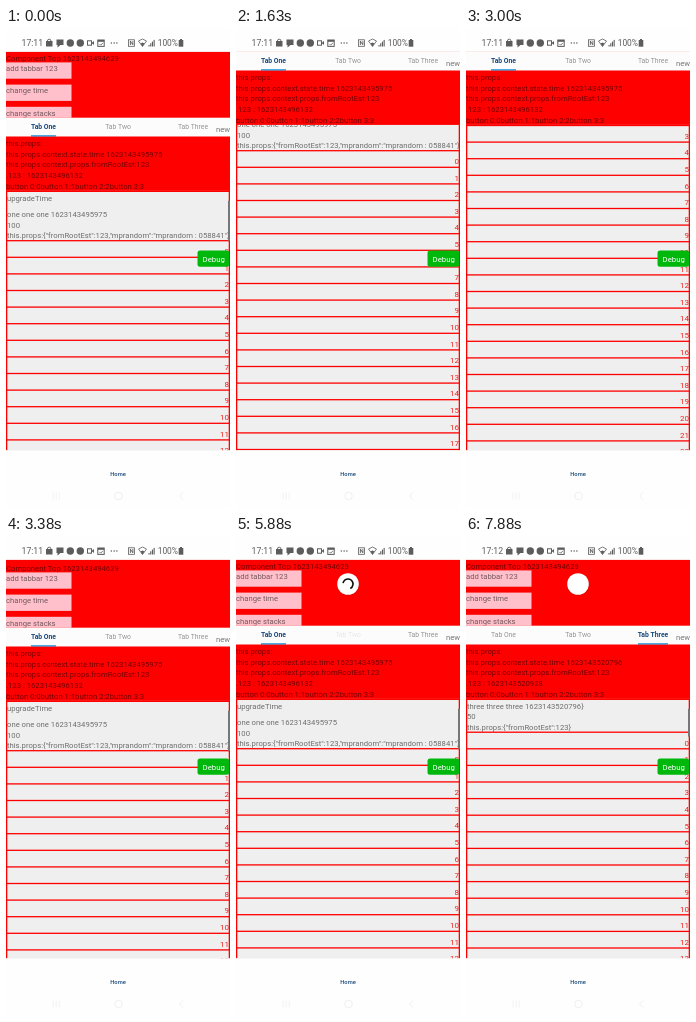
These frames come from a looping animation (224 by 480 pixels, 8000 ms). An HTML page with a canvas:

```html
<!DOCTYPE html>
<html lang="en">
<head>
<meta charset="utf-8">
<title>Tabbed list</title>
<style>
html, body { margin: 0; width: 100%; height: 100%; overflow: hidden; background: #fefefe; }
canvas { display: block; width: 224px; height: 480px; }
</style>
</head>
<body>
<canvas id="stage"></canvas>
<script>
const W = 224, H = 480, LOOP = 8000, STEP = 125;
const BAR = 23.7, HEADER = 66, TABS = 19, PANEL = 54, LIST_END = 422.5, ROW = 16.6, EDGE = 1.3;
const RED = '#ff0000', PAPER = '#fefefe', INK = 'rgba(0,0,0,.54)', NAVY = '#1a4a7c';
const canvas = document.getElementById('stage');
const ctx = canvas.getContext('2d');
const dpr = window.devicePixelRatio || 1;
canvas.width = W * dpr;
canvas.height = H * dpr;

const scrollKeys = [
  [750, 0], [875, 8], [1000, 21], [1250, 50], [1625, 90], [1750, 122], [2000, 230],
  [2250, 345], [2500, 407], [2625, 396], [2875, 255], [3125, 75], [3375, -2], [3500, 0]
];
const pullKeys = [[4250, 0], [4750, 1], [6000, 1], [6125, 0], [7250, 0], [7625, 1]];
const tabs = [
  { name: 'Tab One', x: 37.5, w: 25, word: 'one' },
  { name: 'Tab Two', x: 112, w: 25, word: 'two' },
  { name: 'Tab Three', x: 187, w: 30, word: 'three' }
];

function sample(keys, t) {
  if (t <= keys[0][0]) return keys[0][1];
  for (let i = 1; i < keys.length; i++) {
    const [a, from] = keys[i - 1], [b, to] = keys[i];
    if (t <= b) return from + (to - from) * (t - a) / (b - a);
  }
  return keys[keys.length - 1][1];
}

function rect(x, y, w, h, color) {
  ctx.fillStyle = color;
  ctx.fillRect(x, y, w, h);
}

function disc(x, y, r, color) {
  ctx.fillStyle = color;
  ctx.beginPath();
  ctx.arc(x, y, r, 0, Math.PI * 2);
  ctx.fill();
}

function path(points, color, width = 1, fill = false) {
  ctx.beginPath();
  points.forEach(([x, y], i) => i ? ctx.lineTo(x, y) : ctx.moveTo(x, y));
  ctx.strokeStyle = ctx.fillStyle = color;
  ctx.lineWidth = width;
  fill ? ctx.fill() : ctx.stroke();
}

// y is the visual middle of the line
function text(s, x, y, { size = 7.7, color = INK, align = 'left', weight = 400 } = {}) {
  ctx.font = `${weight} ${size}px Roboto, sans-serif`;
  ctx.textAlign = align;
  ctx.fillStyle = color;
  ctx.fillText(s, x, y + size * .37);
}

function clipped(y, bottom, draw) {
  ctx.save();
  ctx.beginPath();
  ctx.rect(0, y, W, bottom - y);
  ctx.clip();
  draw();
  ctx.restore();
}

function drawStatus(time) {
  const c = '#5c5c5c';
  rect(0, 0, W, BAR, PAPER);
  text(time, 15.5, 15, { size: 8.7, color: c });
  rect(40, 13, 6.5, 5.5, c);
  ctx.strokeStyle = c;
  ctx.lineWidth = .9;
  ctx.beginPath();
  ctx.arc(43.2, 13, 1.8, Math.PI, 0);
  ctx.stroke();
  rect(50.5, 11.5, 7, 5.5, c);
  path([[51.5, 17], [54.5, 17], [51.5, 19.5]], c, 1, true);
  disc(64.3, 15, 3.7, c);
  disc(74.3, 15, 3.7, c);
  ctx.strokeRect(81.5, 12.8, 4, 4.4);
  path([[85.5, 15], [88, 13], [88, 17]], c, 1, true);
  ctx.strokeRect(91.8, 12, 6.4, 6.4);
  rect(91.8, 12, 6.4, 1.8, c);
  path([[93.5, 16], [94.7, 17.2], [97, 14.8]], c, .8);
  for (let i = 0; i < 3; i++) disc(105.3 + i * 2.8, 15, .75, c);
  ctx.strokeRect(122.5, 11.8, 6, 6.5);
  text('N', 125.5, 15, { size: 6, color: c, align: 'center', weight: 700 });
  path([[132.5, 13], [136.5, 11], [140.5, 13], [136.5, 18.5], [132.5, 13]], c, .8);
  path([[134.5, 15.5], [136.5, 14.5], [138.5, 15.5], [136.5, 18.5]], c, 1, true);
  for (let i = 0; i < 4; i++) rect(142.5 + i * 1.7, 17 - i * 1.7, 1.1, 1.5 + i * 1.7, c);
  text('100%', 151.7, 15, { size: 8.4, color: c });
  rect(172.7, 12, 4.6, 6.7, c);
  rect(174, 11, 2, 1, c);
}

function drawHeader(y) {
  text('Component Top 1623143494629', 0, y + 6);
  ['add tabbar 123', 'change time', 'change stacks'].forEach((label, i) => {
    const top = y + 10.7 + i * 22.2;
    rect(0, top, 65.5, 16.3, '#ffc0cb');
    text(label, 0, top + 6);
  });
}

function drawTabs(y, active, pressed) {
  rect(0, y, W, TABS, '#fcfcfc');
  tabs.forEach((tab, i) => {
    const on = i === active;
    const color = on ? NAVY : i === pressed ? '#e8e8e8' : '#939393';
    text(tab.name, tab.x, y + 9.2, { size: 6.8, color, align: 'center', weight: on ? 700 : 400 });
    if (on) rect(tab.x - tab.w / 2, y + 17.5, tab.w, 1.5, '#2196dc');
  });
  text('new', 210, y + 11.3);
}

function drawPanel(y, late) {
  rect(0, y, W, PANEL, RED);
  [
    'this.props:',
    `this.props.context.state.time ${late ? '1623143520796' : '1623143495975'}`,
    'this.props.context.props.fromRootEst:123',
    `.123 : ${late ? '1623143520928' : '1623143496132'}`,
    'button 0:0button 1:1button 2:2button 3:3'
  ].forEach((line, i) => text(line, 0, y + 6.5 + i * 10.7));
}

function drawList(y, top, active) {
  const { word } = tabs[active];
  const stamp = `${word} ${word} ${word} `;
  let first;
  if (active === 0) {
    text('upgradeTime', 1, y + 7);
    text(stamp + '1623143495975', 1, y + 23);
    text('100', 1, y + 34);
    text('this.props:{"fromRootEst":123,"mprandom":"mprandom : 058841"}', 1, y + 44.5);
    first = y + 50;
  } else {
    text(stamp + '1623143520796}', 1, y + 7);
    text('50', 1, y + 17.5);
    text('this.props:{"fromRootEst":123}', 1, y + 28);
    first = y + 33.5;
  }
  rect(0, y, W, EDGE, RED);
  rect(0, top, EDGE, LIST_END - top, RED);
  rect(W - EDGE, top, EDGE, LIST_END - top, RED);
  const start = Math.max(0, Math.floor((top - first) / ROW));
  for (let i = start; first + i * ROW < LIST_END; i++) {
    const line = first + i * ROW;
    rect(0, line - EDGE / 2, W, EDGE, RED);
    text(i, 223, line + 10.4, { size: 8, color: '#f0201c', align: 'right' });
  }
}

function drawSpinner(pull, t) {
  if (pull <= 0) return;
  const y = 12 + 36 * pull;
  clipped(BAR, H, () => {
    disc(112, y + .4, 11.1, 'rgba(0,0,0,.15)');
    disc(112, y, 10.8, '#fff');
    if (t > 7000) return;
    const a = Math.PI * 1.05 + (t - 5875) / 1000 * Math.PI * 2;
    ctx.strokeStyle = '#111';
    ctx.lineWidth = 1.6;
    ctx.beginPath();
    ctx.arc(112, y, 5, a, a + Math.PI * 1.3);
    ctx.stroke();
  });
}

function drawFooter() {
  rect(0, LIST_END, W, H - LIST_END, PAPER);
  text('Home', 112, 446, { size: 5.8, color: NAVY, align: 'center', weight: 500 });
  const faint = '#f0f0f0';
  for (let i = -1; i < 2; i++) rect(49.7 + i * 3, 464.5, .9, 7, faint);
  ctx.strokeStyle = faint;
  ctx.lineWidth = 1;
  ctx.beginPath();
  ctx.arc(112.5, 468, 3.8, 0, Math.PI * 2);
  ctx.stroke();
  path([[177, 464.5], [173.5, 468], [177, 471.5]], faint);
}

function drawDebug() {
  ctx.fillStyle = '#00b80c';
  ctx.beginPath();
  ctx.roundRect(191.5, 222.5, 31.7, 16.2, 2.5);
  ctx.fill();
  text('Debug', 207.7, 231, { size: 7.8, color: '#fff', align: 'center' });
}

function render(time) {
  const t = Math.floor(time / STEP) * STEP;
  const scroll = sample(scrollKeys, t);
  const active = t < 6125 ? 0 : t < 7125 ? 1 : 2;
  const pressed = t >= 5875 && t < 6125 ? 1 : -1;
  const late = t >= 6500;
  const headerY = BAR - Math.min(scroll, HEADER);
  const tabY = headerY + HEADER, panelY = tabY + TABS, listY = panelY + PANEL;
  const inner = Math.max(0, scroll - HEADER);

  ctx.setTransform(dpr, 0, 0, dpr, 0, 0);
  rect(0, 0, W, H, '#efefef');
  rect(0, BAR, W, listY - BAR, RED);
  clipped(BAR, tabY, () => drawHeader(headerY));
  clipped(listY, LIST_END, () => drawList(listY - inner, listY, active));
  drawTabs(tabY, active, pressed);
  drawPanel(panelY, late);
  if (scroll <= 0) rect(222, listY + 10, 2, active ? 28 : 40, '#777');
  drawStatus(late ? '17:12' : '17:11');
  drawSpinner(sample(pullKeys, t), t);
  drawFooter();
  drawDebug();
}

const begin = performance.now();
function tick() {
  render((performance.now() - begin) % LOOP);
  requestAnimationFrame(tick);
}
tick();
</script>
</body>
</html>
```
